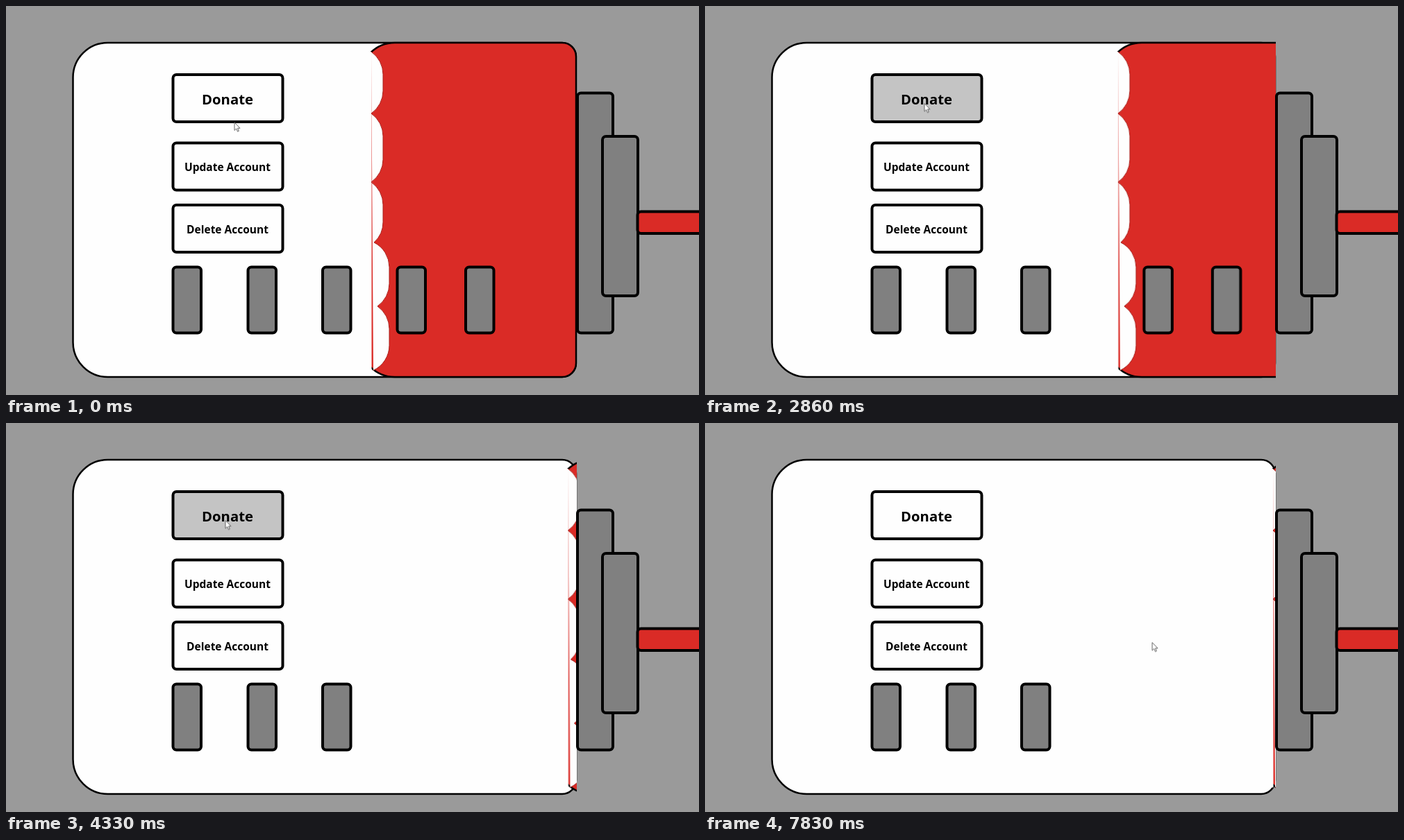
An HTML page for the animation above (7860 ms loop, 998 by 561 pixels).

```html
<!DOCTYPE html>
<html lang="en">
<head>
<meta charset="utf-8">
<title>Donation bag</title>
<style>
  html, body { margin: 0; width: 100%; height: 100%; overflow: hidden; background: #9a9a9a; }
  svg { display: block; width: 998px; height: 561px; font-family: "Open Sans", "Noto Sans", sans-serif; }
  .line { stroke: #000; stroke-width: 2.5; }
  .box { stroke: #000; stroke-width: 4; }
  .paper { fill: #fefefe; }
  .red { fill: #da2b26; }
  .metal { fill: #808080; }
  .label { font-weight: 700; font-size: 15.5px; text-anchor: middle; }
  .small { font-size: 10.15px; fill: #1a1a1a; }

  #fill, #donate, #update, #dialog, #cursor { animation: 7860ms linear infinite; }
  #fill { animation-name: drain; }
  #donate { animation-name: donate; animation-timing-function: step-end; }
  #update { animation-name: update; animation-timing-function: step-end; }
  #dialog { animation-name: dialog; animation-timing-function: step-end; }
  #cursor { animation-name: point; }

  @keyframes drain {
    0%, 31.1% { transform: translateX(0); }
    31.101% { transform: translateX(8px); }
    55.85%, 100% { transform: translateX(292px); }
  }
  @keyframes donate {
    0%, 4.3%, 20.4%, 57.25%, 100% { fill: #fefefe; }
    .76%, 11.1%, 22.8% { fill: #c4c4c4; }
  }
  @keyframes update {
    0%, 10.6%, 100% { fill: #fefefe; }
    5.1% { fill: #c4c4c4; }
  }
  @keyframes dialog {
    0%, 90.3%, 100% { visibility: hidden; }
    57.25% { visibility: visible; }
  }
  @keyframes point {
    0% { transform: translate(329px, 168px); }
    1.5% { transform: translate(324px, 150px); }
    4.45% { transform: translate(312px, 182px); }
    7.1% { transform: translate(304px, 212px); }
    10.18% { transform: translate(300px, 186px); }
    12.7% { transform: translate(302px, 150px); }
    19.1% { transform: translate(312px, 150px); }
    20.9% { transform: translate(320px, 178px); }
    24.2% { transform: translate(318px, 155px); }
    28% { transform: translate(316px, 140.5px); }
    75.1% { transform: translate(316px, 140.5px); animation-timing-function: ease-in-out; }
    87.8%, 100% { transform: translate(644px, 316.5px); }
  }
</style>
</head>
<body>
<svg viewBox="0 0 998 561">
  <defs>
    <clipPath id="bag"><rect width="822" height="561"/></clipPath>
    <filter id="shadow" x="-10%" y="-20%" width="120%" height="145%">
      <feDropShadow dx="0" dy="2" stdDeviation="4" flood-opacity=".4"/>
    </filter>
    <rect id="bar" class="box metal" width="40.5" height="95" rx="5"/>
  </defs>
  <rect width="998" height="561" fill="#9a9a9a"/>

  <path class="paper line" d="M146.500 53H801A20 20 0 0 1 821 73V515A20 20 0 0 1 801 535H146.500A50 50 0 0 1 96.500 485V103A50 50 0 0 1 146.500 53Z"/>

  <g clip-path="url(#bag)">
    <g id="fill">
      <path class="red line" d="M560 53H801A20 20 0 0 1 821 73V515A20 20 0 0 1 801 535H560A50 50 0 0 1 510 485V103A50 50 0 0 1 560 53Z"/>
      <rect class="paper" x="500" y="66" width="26.500" height="459.500"/>
      <path id="scallops" class="paper" stroke="#a8201c"/>
      <use href="#bar" x="563.500" y="376.500"/>
      <use href="#bar" x="662" y="376.500"/>
    </g>
  </g>

  <use href="#bar" x="240.500" y="376.500"/>
  <use href="#bar" x="348.500" y="376.500"/>
  <use href="#bar" x="456" y="376.500"/>

  <g class="box">
    <rect class="metal" x="823" y="125.500" width="51" height="346" rx="5"/>
    <rect class="metal" x="859" y="188" width="51" height="230" rx="5"/>
    <rect class="red" x="909.500" y="296.500" width="110" height="31.500" rx="5"/>
  </g>

  <g class="box paper">
    <rect id="donate" x="240.500" y="99" width="158" height="68" rx="5"/>
    <rect id="update" x="240.500" y="197.500" width="158" height="68" rx="5"/>
    <rect x="240.500" y="287" width="158" height="68" rx="5"/>
  </g>
  <text class="label" x="319" y="141.500" style="font-size:20.3px">Donate</text>
  <text class="label" x="319" y="238">Update Account</text>
  <text class="label" x="319" y="328">Delete Account</text>

  <g id="dialog">
    <rect x="317" y="225" width="355" height="106" fill="#fff" filter="url(#shadow)"/>
    <rect x="317" y="291" width="355" height="40" fill="#f0f0f0"/>
    <rect x="317.500" y="225.500" width="354" height="105" fill="none" stroke="#858585"/>
    <rect x="320.500" y="231.500" width="12" height="10" fill="#eef3f6" stroke="#7b8790"/>
    <rect x="322" y="233" width="5" height="7" fill="#2f8190"/>
    <text class="small" x="337" y="240">Important</text>
    <path d="M652.500 232l8.500 8.500M661 232l-8.500 8.500" stroke="#444"/>
    <circle cx="341.500" cy="271.500" r="13.500" fill="#0078d7"/>
    <path d="M341.500 264v2M341.500 268.500V279" stroke="#fff" stroke-width="1.700"/>
    <text class="small" x="372.500" y="269">Your Request Has been sent to the Admin Wait For Response</text>
    <rect x="595.750" y="301.750" width="64.500" height="18.500" fill="#e1e1e1" stroke="#2a72c8" stroke-width="1.500"/>
    <text class="small" x="628" y="314.500" text-anchor="middle">OK</text>
  </g>

  <path id="cursor" d="M0 0V11.500L2.700 9L4.500 13.200L6.300 12.400L4.600 8.300H8Z" fill="#fff" stroke="#555" stroke-width=".9"/>
</svg>
<script>
  // Each scallop: top tip, bulge edge, bottom tip.
  const scallops = [
    [526, 66, 543, 526, 155],
    [526, 155, 543, 526, 254],
    [526, 254, 543, 530, 341],
    [530, 341, 552, 535, 433],
    [535, 433, 552, 529, 525.5]
  ];
  const R = 40;
  const rise = dx => Math.sqrt(2 * R * dx - dx * dx);
  const arc = (x, y) => `A${R} ${R} 0 0 1 ${x} ${y}`;
  const path = scallops.map(([x1, y1, edge, x2, y2]) =>
    arc(edge, y1 + rise(edge - x1)) + `V${y2 - rise(edge - x2)}` + arc(x2, y2));
  document.getElementById('scallops').setAttribute('d', 'M526 66' + path.join(''));
</script>
</body>
</html>
```
